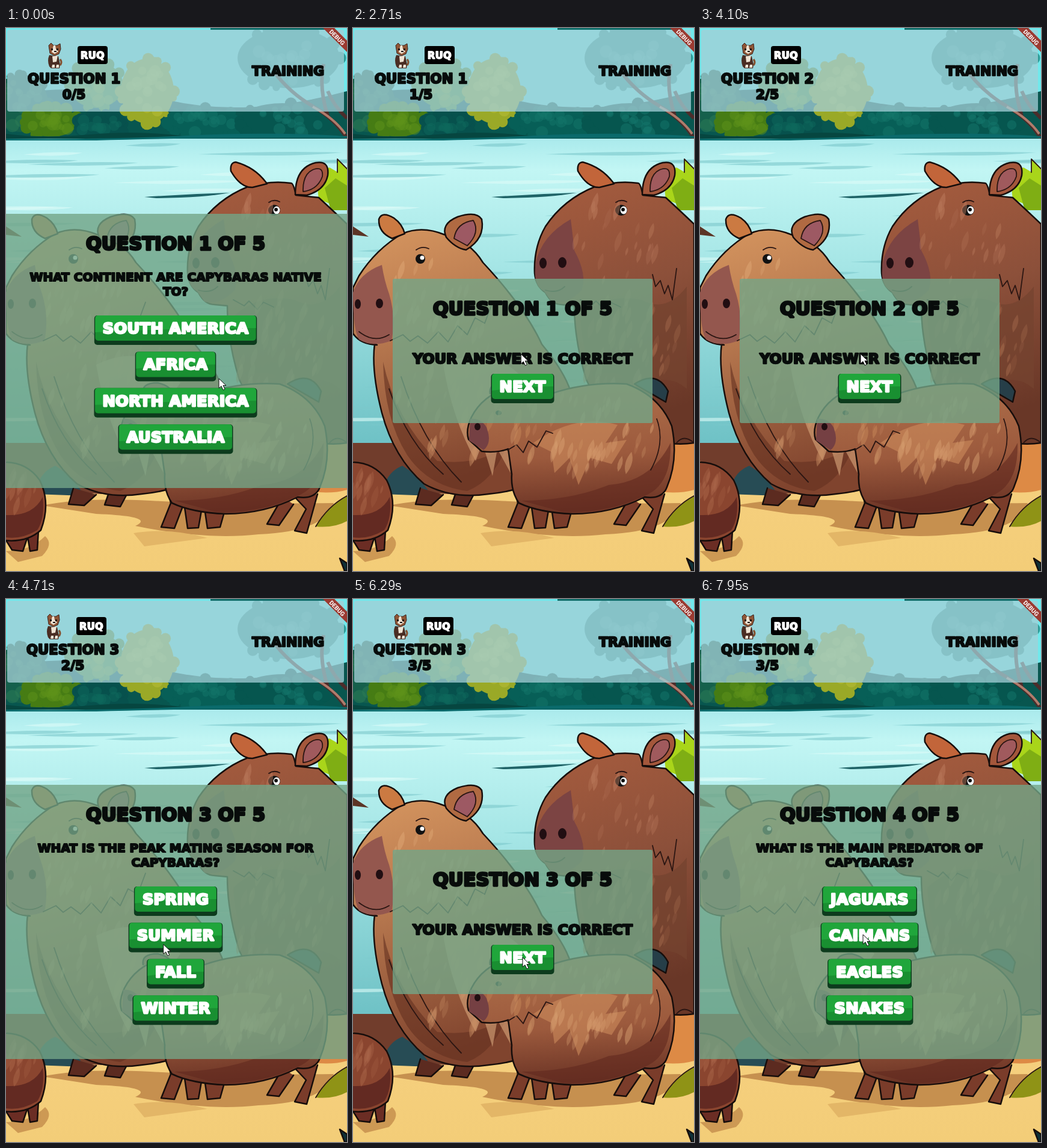
Write an HTML page that moves like this. It is 567 by 903 pixels and loops after 8000 ms.

```html
<!DOCTYPE html>
<html lang="en">
<head>
<meta charset="utf-8">
<title>Capybara quiz</title>
<style>
  html, body { margin: 0; height: 100%; overflow: hidden; background: #b4efee; }
  svg { display: block; width: 100vw; height: 100vh; }
  text { font: bold 22px "DejaVu Sans", sans-serif; text-anchor: middle; fill: #080c0b; stroke: #080c0b; stroke-width: .11em; stroke-linejoin: round; }
  text.white { fill: #fff; stroke: #fff; letter-spacing: .3px; }
  text.debug { font: bold 10px Roboto, sans-serif; fill: #fff; stroke: none; }
  .line { stroke: #160d0b; stroke-width: 2.5; stroke-linejoin: round; stroke-linecap: round; }
  .thin { fill: none; stroke: #2a1512; stroke-width: 1.8; stroke-linecap: round; stroke-linejoin: round; }
</style>
</head>
<body>
<svg viewBox="0 0 567 903" preserveAspectRatio="none">
  <defs>
    <linearGradient id="water" x2="0" y2="1">
      <stop offset="0" stop-color="#aaeaec"/><stop offset=".1" stop-color="#c2f6f4"/>
      <stop offset=".4" stop-color="#a6e6e6"/><stop offset="1" stop-color="#6cc0c4"/>
    </linearGradient>
    <linearGradient id="tan" x2=".25" y2="1">
      <stop offset="0" stop-color="#d6965f"/><stop offset=".4" stop-color="#b97a50"/>
      <stop offset="1" stop-color="#80442e"/>
    </linearGradient>
    <linearGradient id="brown" x2=".2" y2="1">
      <stop offset="0" stop-color="#a65c3e"/><stop offset=".5" stop-color="#8c503a"/>
      <stop offset="1" stop-color="#693727"/>
    </linearGradient>
    <linearGradient id="pup" x2=".1" y2="1">
      <stop offset="0" stop-color="#b0714b"/><stop offset=".6" stop-color="#9c5a3d"/>
      <stop offset="1" stop-color="#6d3526"/>
    </linearGradient>
    <linearGradient id="sand" x2="0" y2="1">
      <stop offset="0" stop-color="#e9b566"/><stop offset=".4" stop-color="#f5cf7d"/>
      <stop offset="1" stop-color="#f3cd78"/>
    </linearGradient>
  </defs>

  <rect width="567" height="190" fill="#70e9ec"/>
  <g id="trees"></g>
  <path d="M567 184Q548 152 510 130T445 72M535 146Q520 100 528 60M567 150Q545 130 535 105" fill="none" stroke="#4c2d2b" stroke-width="6"/>
  <path d="M564 176Q546 150 510 131" fill="none" stroke="#b07c6c" stroke-width="4"/>
  <rect y="184" width="567" height="520" fill="url(#water)"/>
  <g id="ripples"></g>
  <path d="M0 184Q160 186 300 179T567 180V183Q300 182 150 187L0 187Z" fill="#0a6a6b"/>
  <path d="M230 281Q300 276 372 274Q330 282 250 283Z" fill="#1f6367"/>
  <path d="M0 330L26 347L0 344Z" fill="#5c3526"/>
  <path d="M515 240L538 232L552 240L551 218L567 234V303L520 285Z" fill="#a9d51a"/>
  <path d="M530 266L548 250L567 262V303H540Z" fill="#7fae14"/>
  <path d="M551 240V218L567 234" class="thin"/>

  <path d="M0 690H567V903H0Z" fill="url(#sand)"/>
  <path d="M0 690H110L160 775L60 770L0 720Z" fill="#713d2c"/>
  <path d="M48 775Q55 738 82 728Q112 745 130 778Z" fill="#274c55"/>
  <path d="M500 690H567V768Q540 776 500 770Z" fill="#dd8a45"/>
  <path d="M60 794Q130 780 240 786T545 790Q530 838 420 842Q330 852 215 828Q250 812 150 808Z" fill="#c6904f"/>
  <path d="M212 840Q270 830 335 848L230 862Z" fill="#e3b667"/>
  <path d="M0 870Q40 870 65 845Q80 858 60 878L20 888Z" fill="#cd9954"/>
  <path d="M515 829Q535 795 567 778V820Q545 832 515 829Z" fill="#8f9316"/>
  <path d="M515 829Q535 795 567 778" class="thin"/>
  <path d="M555 882L567 890V903H563Z" fill="#0d3038" class="line"/>

  <!-- large animal on the right -->
  <g>
    <path d="M368 462Q368 520 388 585L420 650Q500 700 567 690V326Q545 305 520 282L482 278Q478 258 474 258Q440 253 402 264Q350 285 320 330Q300 365 302 408Q304 430 320 440Q330 460 347 460Z" fill="url(#brown)" class="line"/>
    <path d="M362 318Q366 350 368 370Q390 410 380 436Q355 462 330 455L318 438Q298 428 304 390Q314 345 362 318Z" fill="#7c4443"/>
    <path d="M378 480Q420 440 480 452Q520 475 555 430V600Q520 570 480 600Q440 560 400 580Q380 530 378 480Z" fill="#75432f" opacity=".75"/>
    <path d="M410 265Q390 266 374 238Q372 224 382 223Q415 232 434 259Z" fill="#c2653a" class="line"/>
    <path d="M481 277Q481 232 515 224Q538 220 535 245Q530 270 500 278Z" fill="#a4573b" class="line"/>
    <path d="M494 272Q493 242 512 235Q528 230 526 247Q518 269 494 272Z" fill="#a05a5d" class="thin" style="fill:#a05a5d"/>
    <ellipse cx="316" cy="391" rx="6" ry="9" fill="#210e12"/><ellipse cx="348" cy="390" rx="7" ry="9" fill="#210e12"/>
    <ellipse cx="446" cy="303" rx="10" ry="9" fill="#111"/><ellipse cx="450" cy="303" rx="5.5" ry="6.5" fill="#fff"/><circle cx="449" cy="302" r="3" fill="#111"/>
    <path d="M437 290Q446 284 455 289M320 436Q340 442 352 430M378 452L396 462L404 454L418 468L428 456L445 464M498 410L503 430L511 420L518 442L524 428L531 452L538 400M538 690Q550 675 567 690" class="thin"/>
    <g data-fur="435 360 80 75 20 #c08163"></g>
    <g data-fur="465 530 85 90 45 #a76d4e"></g>
  </g>
  <path d="M468 592Q505 568 524 604L520 622Z" fill="#263e48" class="line"/>

  <!-- large animal on the left -->
  <g>
    <path d="M112 765L104 792L130 794L150 776M172 770L164 793L190 796L206 766" fill="#5c2b20" class="line"/>
    <path d="M36 525Q30 570 48 640Q68 715 118 758Q165 784 225 775Q300 768 340 730L362 605Q352 572 314 526Q286 465 216 390Q195 355 153 344Q115 328 82 342Q38 368 10 412L0 432V508Q12 526 40 527Z" fill="url(#tan)" class="line"/>
    <path d="M48 394Q52 420 60 442Q72 482 64 520Q32 532 10 518Q0 502 0 440Q10 408 48 394Z" fill="#94574e"/>
    <path d="M50 555Q70 650 140 720Q230 730 260 680Q240 750 190 770Q125 762 90 710Q52 650 50 555Z" fill="#653121" opacity=".6"/>
    <path d="M150 560Q230 520 290 590Q250 640 262 740L240 700L232 745L215 690L204 720Q165 650 150 560Z" fill="#d3a077" opacity=".65"/>
    <path d="M65 350Q42 340 43 318Q48 304 68 316Q82 326 86 342Z" fill="#cb7a42" class="line"/>
    <path d="M155 348Q145 326 174 314Q205 304 214 318Q220 350 188 369Q170 366 155 348Z" fill="#b06a42" class="line"/>
    <path d="M168 350Q172 324 200 320Q212 340 190 362Z" fill="#9d5963" class="thin" style="fill:#9d5963"/>
    <ellipse cx="8" cy="459" rx="5" ry="8" fill="#210e12"/><ellipse cx="44" cy="458" rx="6" ry="8" fill="#210e12"/>
    <ellipse cx="112" cy="384" rx="8" ry="8" fill="#111"/><circle cx="115" cy="382" r="3.5" fill="#fff"/>
    <path d="M105 369Q115 362 126 367M10 505Q35 525 60 510M62 520L83 510L95 521L108 512L124 524L142 505L158 522L174 495L190 510L203 482L219 491L232 456M60 600Q90 690 150 742M80 580Q115 690 180 755" class="thin"/>
    <g data-fur="135 445 70 65 22 #e0ab78"></g>
    <g data-fur="180 610 105 115 55 #cc9267"></g>
  </g>

  <!-- small animal in front -->
  <g>
    <path d="M268 765L274 790L258 830L280 832L296 790L302 832L320 831L328 785L335 832L356 830L370 780M460 780L434 825L454 827L478 792M480 780L499 800L480 836L500 840L518 775" fill="#7a3c2a" class="line"/>
    <path d="M192 684Q187 668 197 647Q216 610 260 598Q295 602 330 608Q390 588 455 592Q510 612 530 662Q542 720 520 768Q510 784 485 780Q430 808 365 808Q310 806 276 790Q262 770 264 742L258 700Q240 707 214 704Z" fill="url(#pup)" class="line"/>
    <path d="M195 650Q212 648 222 664Q232 690 217 702L193 686Z" fill="#754043"/>
    <path d="M280 786Q360 786 425 760Q495 755 528 690Q530 760 485 778Q420 808 350 805Z" fill="#61291f" opacity=".6"/>
    <path d="M300 690Q370 640 440 660L420 690L455 685L430 725L395 715L375 760L360 715L335 740L330 705Z" fill="#d1905f" opacity=".55"/>
    <ellipse cx="207" cy="663" rx="5" ry="6" fill="#210e12"/>
    <ellipse cx="242" cy="640" rx="5" ry="4" fill="#111"/>
    <path d="M228 608Q225 590 252 590Q275 595 278 610" fill="#8b4d35" class="line"/>
    <path d="M257 702L272 693L283 706L292 687L306 697L321 670L332 674M505 650Q520 690 495 735" class="thin"/>
    <g data-fur="390 675 120 68 50 #d8a071"></g>
    <g data-fur="270 645 45 36 12 #cb8b5b"></g>
  </g>

  <!-- animal at the lower left -->
  <g>
    <path d="M0 852L10 868L28 870L36 846L40 870L52 868L54 835" fill="#6b2d24" class="line"/>
    <path d="M-3 722Q35 722 56 752Q75 790 58 835Q35 856 -3 852Z" fill="#8a452f" class="line"/>
    <path d="M0 810Q45 812 61 780Q65 815 52 835Q25 851 0 847Z" fill="#632a22"/>
    <g data-fur="22 770 30 34 12 #b06c4e"></g>
  </g>

  <rect x="2" y="3" width="560" height="136" rx="4" fill="#a4cfd7" opacity=".76"/>
  <path d="M527 0H546L567 21V40Z" fill="#9b3a31"/>
  <text class="debug" transform="translate(548 18) rotate(45)">DEBUG</text>
  <g id="ui"></g>
  <g id="pointer">
    <circle id="glow" r="12" fill="#f4ea35" opacity=".75"/>
    <path d="M0 0V16L4 12.5L7 19L10 17.5L7 11.5H12Z" fill="#fff" stroke="#111"/>
  </g>
</svg>
<script>
const $ = id => document.getElementById(id);
const ui = $('ui'), CX = 282;

let seed = 7;
const rand = () => (seed = seed * 16807 % 2147483647) / 2147483647;

function bush(x, y, w, h, color, light) {
  let out = `<ellipse cx="${x}" cy="${y}" rx="${w}" ry="${h}" fill="${color}"/>`;
  for (let i = 0; i < 34; i++) {
    const edge = i < 18, a = rand() * 6.28, d = edge ? 1 : rand() * .85;
    out += `<circle cx="${x + Math.cos(a) * w * d}" cy="${y + Math.sin(a) * h * d}" r="${5 + rand() * 6}" fill="${edge ? color : light}" opacity="${edge ? 1 : .5}"/>`;
  }
  return out;
}

$('trees').innerHTML =
  '<path d="M0 110Q140 90 270 120T567 105V190H0Z" fill="#08564f"/>' +
  bush(470, 50, 85, 50, '#2c9c98', '#49b6af') +
  bush(25, 125, 45, 48, '#15604c', '#2b7b55') +
  bush(150, 95, 45, 38, '#4f8d30', '#86a72a') +
  bush(75, 156, 44, 25, '#467c14', '#5d9119') +
  bush(155, 166, 42, 23, '#07514d', '#0d675c') +
  bush(235, 105, 44, 54, '#9aa927', '#b9bf37') +
  bush(330, 157, 62, 24, '#075f57', '#13756a') +
  bush(460, 155, 72, 30, '#06564f', '#14756c') +
  '<path d="M0 176Q60 184 140 177T300 180L567 179V188H0Z" fill="#064640"/><path d="M340 0H532V3H340Z" fill="#126f6c"/>';

let ripples = '';
for (let i = 0; i < 60; i++) {
  const x = rand() * 640 - 100, y = 195 + rand() * 480, w = 70 + rand() * 180;
  ripples += `<path d="M${x} ${y}q${w / 2} -6 ${w} -3q${-w / 3} 8 ${-w} 3Z" fill="${i % 3 ? '#7cc8cc' : '#dcfcf9'}" opacity=".6"/>`;
}
$('ripples').innerHTML = ripples;

// Tapered tufts scattered inside an ellipse
for (const g of document.querySelectorAll('[data-fur]')) {
  const [x, y, rx, ry, count, color] = g.dataset.fur.split(' ');
  let tufts = '';
  for (let i = 0; i < count; i++) {
    const a = rand() * 6.28, d = Math.sqrt(rand()), n = 14 + rand() * 24;
    const px = +x + Math.cos(a) * rx * d, py = +y + Math.sin(a) * ry * d - n / 2;
    tufts += `<path d="M${px} ${py}q${n / 6} ${n / 2} ${-n / 4} ${n}q${-n / 6} ${-n / 2} ${n / 4} ${-n}Z" fill="${color}" opacity="${.15 + rand() * .35}"/>`;
  }
  g.innerHTML = tufts;
}

const quiz = [
  [['What continent are capybaras native', 'to?'], ['South America', 'Africa', 'North America', 'Australia']],
  [['What type of animal are capybaras', 'classified as?'], ['Rodents', 'Primates', 'Carnivores', 'Reptiles']],
  [['What is the peak mating season for', 'capybaras?'], ['Spring', 'Summer', 'Fall', 'Winter']],
  [['What is the main predator of', 'capybaras?'], ['Jaguars', 'Caimans', 'Eagles', 'Snakes']]
];
const headerX = [113, 112, 111, 112];

const label = (x, y, size, str, cls = '') =>
  `<text x="${x}" y="${y}" class="${cls}" style="font-size:${size}px">${str.toUpperCase()}</text>`;
const panel = (x, y, w, h, r) =>
  `<rect x="${x}" y="${y}" width="${w}" height="${h}" rx="${r}" fill="#74a587" opacity=".8"/>`;

function button(str, y, down) {
  const g = document.createElementNS('http://www.w3.org/2000/svg', 'g');
  ui.append(g);
  g.innerHTML = label(CX, 30, 25.5, str, 'white');
  const w = g.firstChild.getComputedTextLength() + 28, x = CX - w / 2;
  g.setAttribute('transform', `translate(0 ${y + (down ? 5 : 0)})`);
  g.innerHTML =
    `<rect x="${x}" width="${w}" height="${down ? 44 : 49}" rx="5" fill="#0d3b1d"/>` +
    `<rect x="${x + 1.5}" width="${w - 3}" height="42" rx="5" fill="#198f31"/>` +
    `<path d="M${x + 1.5} 28V5q0 -5 5 -5h${w - 13}q5 0 5 5v16Q${CX} 21 ${x + 1.5} 28Z" fill="#20a63b"/>` +
    g.innerHTML;
}

function dog(x) {
  return `<g transform="translate(${x} 25)">
    <path d="M3 20Q-1 29 3 39L6 42H20L21 36L18 22Z" fill="#4a2d23"/>
    <path d="M2 4L6 0L10 4H16L21 1L22 10L19 18L12 21L4 17Z" fill="#8f5636" stroke="#3a211c"/>
    <path d="M10 4L13 4L14 10L18 14L12 18L7 15Z M8 22L17 21L15 31L9 32Z M8 36H12V41H7Z M15 36H19V41H14Z" fill="#efe4d4"/>
    <path d="M6 9h3v3H6ZM15 9h3v3H15ZM11 13h4v2H11Z" fill="#1b1213"/>
    <path d="M21 37Q25 32 21 27" fill="none" stroke="#84502f" stroke-width="3"/></g>`;
}

function draw(done, down) {
  const q = done >> 1, answered = done % 2, x = headerX[q], title = `Question ${q + 1} of 5`;
  ui.innerHTML = dog(x - 44) +
    `<rect x="${x + 6}" y="30" width="50" height="30" rx="4" fill="#000"/>` +
    label(x + 31, 51, 16, 'RUQ', 'white') +
    label(x, 92, 22.5, `Question ${q + 1}`) +
    label(x, 118, 22, `${Math.ceil(done / 2)}/5`) +
    label(469, 79, 22, 'Training');
  if (answered) {
    ui.innerHTML += panel(66, 417, 432, 240, 3) + label(CX, 477, 30.5, title) +
      label(CX, 558, 23.8, 'Your answer is correct');
    button('Next', 575, down);
  } else {
    const [lines, answers] = quiz[q];
    ui.innerHTML += panel(0, 309, 567, 456, 0) + label(CX, 369, 30.5, title) +
      lines.map((s, i) => label(CX, 421 + 24 * i, 20, s)).join('');
    answers.forEach((s, i) => button(s, 478 + 60.4 * i, down && !i));
  }
}

// Each click: glow, then press, then the next screen
const clicks = [2310, 2990, 3680, 4240, 5870, 6490];
const moves = [
  [0, 354, 583], [40, 354, 583], [620, 285, 504], [2480, 285, 504], [2960, 273, 585],
  [3370, 273, 585], [3650, 269, 503], [3860, 269, 503], [4100, 267, 542], [4200, 272, 589],
  [4400, 272, 589], [4990, 253, 562], [5740, 269, 499], [6010, 269, 499], [6290, 282, 596],
  [6490, 282, 596], [6630, 285, 612], [7260, 279, 627], [7950, 271, 558], [8000, 271, 558]
];

const start = performance.now();
let shown = '';
function frame() {
  const t = (performance.now() - start) % 8000;
  const done = clicks.filter(c => t >= c + 140).length;
  const since = t - clicks[done];
  const down = since >= 70;
  const state = done + '/' + down;
  if (shown !== state) {
    shown = state;
    draw(done, down);
  }
  const i = moves.findIndex(m => m[0] > t);
  const [t0, x0, y0] = moves[i - 1], [t1, x1, y1] = moves[i];
  const p = (t - t0) / (t1 - t0), e = p * p * (3 - 2 * p);
  $('pointer').setAttribute('transform', `translate(${x0 + (x1 - x0) * e} ${y0 + (y1 - y0) * e})`);
  $('glow').style.display = since >= 0 ? '' : 'none';
  requestAnimationFrame(frame);
}
frame();
</script>
</body>
</html>
```
